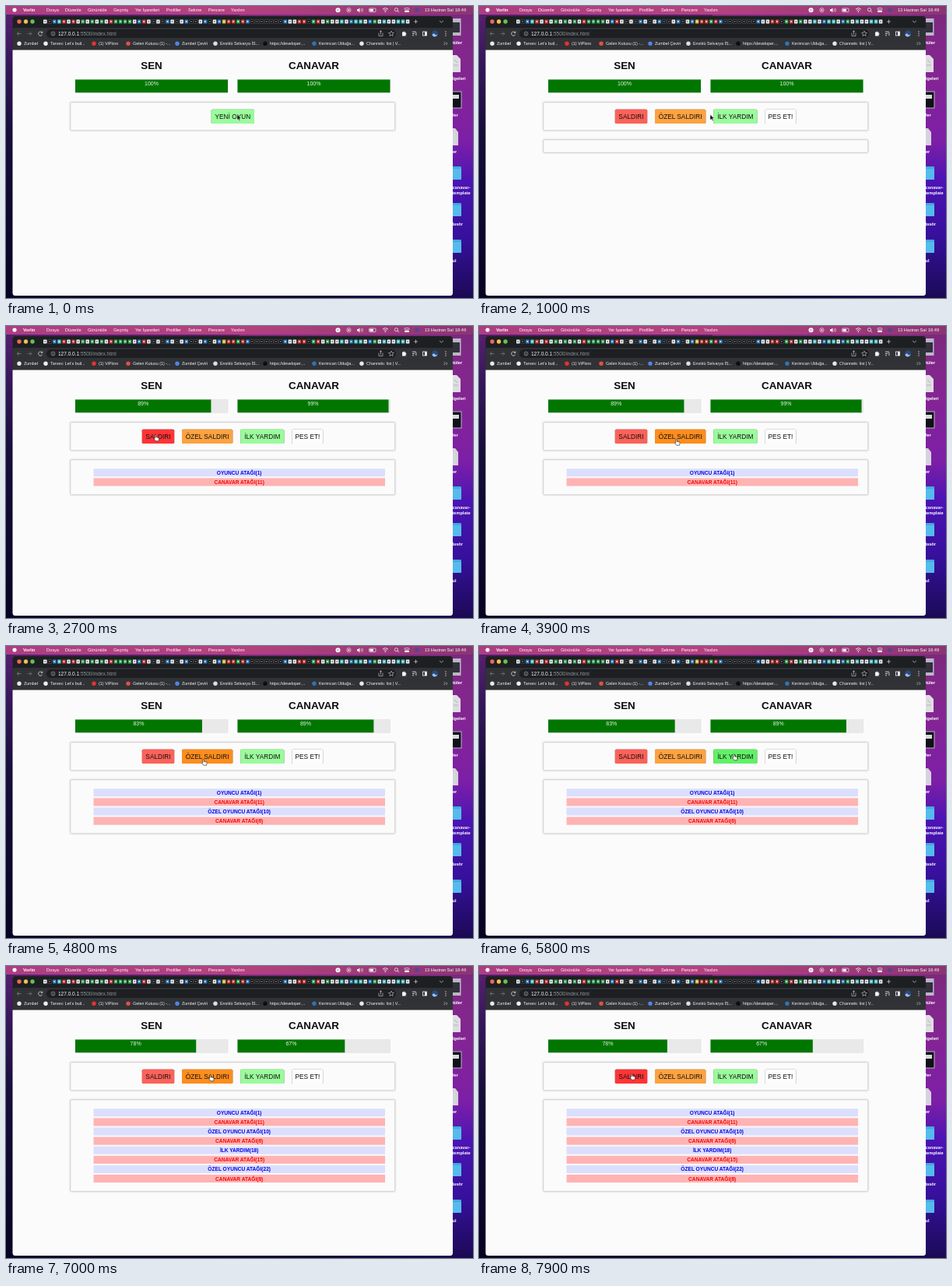
Recreate the animation shown at these times as an HTML page. Size 600x375 px, loop 8 s.

```html
<!DOCTYPE html>
<html lang="tr">
<head>
<meta charset="utf-8">
<title>Canavar Oyunu</title>
<style>
html, body { margin: 0; width: 100%; height: 100%; overflow: hidden; background: #1c1048; }
svg { display: block; width: 100vw; height: 100vh; font-family: "Liberation Sans", Arial, sans-serif; }
.panel { fill: #fbfbfb; stroke: #d2d2d2; stroke-width: .5; filter: drop-shadow(0 .8px .9px rgba(0,0,0,.32)); }
.button { filter: drop-shadow(0 .9px .6px rgba(0,0,0,.65)); }
</style>
</head>
<body>
<svg id="stage" viewBox="0 0 600 375" preserveAspectRatio="none">
  <defs>
    <linearGradient id="menu"><stop offset="0" stop-color="#ad3d82"/><stop offset=".5" stop-color="#b5427f"/><stop offset="1" stop-color="#8a3573"/></linearGradient>
    <linearGradient id="left" x2="0" y2="1"><stop offset="0" stop-color="#5c2170"/><stop offset=".2" stop-color="#34165a"/><stop offset=".42" stop-color="#170e3c"/><stop offset=".7" stop-color="#0e0730"/><stop offset="1" stop-color="#080322"/></linearGradient>
    <linearGradient id="right" x2="0" y2="1"><stop offset="0" stop-color="#7b2a7c"/><stop offset=".2" stop-color="#84268f"/><stop offset=".46" stop-color="#7d1fa6"/><stop offset=".6" stop-color="#4c14b4"/><stop offset=".8" stop-color="#35109a"/><stop offset="1" stop-color="#1b0a55"/></linearGradient>
    <linearGradient id="bottom"><stop offset="0" stop-color="#080322"/><stop offset=".6" stop-color="#10062e"/><stop offset="1" stop-color="#1b0a55"/></linearGradient>
  </defs>
  <g id="desktop"></g>
  <g id="browser"></g>
  <g id="game"></g>
  <g id="cursor" stroke-linejoin="round"></g>
</svg>
<script>
const NS = "http://www.w3.org/2000/svg";
const byId = id => document.getElementById(id);

function add(parent, tag, attrs, content) {
  const node = document.createElementNS(NS, tag);
  for (const key in attrs) node.setAttribute(key, attrs[key]);
  if (content !== undefined) node.textContent = content;
  parent.appendChild(node);
  return node;
}
const rect = (p, x, y, width, height, fill, extra) => add(p, "rect", { x, y, width, height, fill, ...extra });
const circle = (p, cx, cy, r, fill, extra) => add(p, "circle", { cx, cy, r, fill, ...extra });
const path = (p, d, stroke, extra) => add(p, "path", { d, stroke, fill: "none", "stroke-width": .8, ...extra });
const text = (p, x, y, size, fill, content, extra) =>
  add(p, "text", { x, y, "font-size": size, fill, ...extra }, content);
const centred = { "text-anchor": "middle" };
const boldCentred = { ...centred, "font-weight": "bold" };

function drawDesktop(g) {
  rect(g, 0, 0, 300, 375, "url(#left)");
  rect(g, 300, 0, 300, 375, "url(#right)");
  rect(g, 0, 371, 600, 4, "url(#bottom)");

  rect(g, 570, 16, 14.5, 22, "#b9b8c4");
  rect(g, 574, 21, 9, 13, "#33303f");
  path(g, "M570 63h9l5 5v17h-14z", "none", { fill: "#dedde2" });
  path(g, "M576 69l4 4M575 76h6", "#a9a7b2");
  rect(g, 570, 110, 15, 21, "#111118", { stroke: "#d8d8df", "stroke-width": .8 });
  rect(g, 574, 114, 8, 5, "#d8d8df");
  path(g, "M570 157h7l4 5v17h-11z", "none", { fill: "#d5d3dc" });
  for (const y of [206, 253, 300]) {
    rect(g, 566, y, 19, 17, "#43a9dd", { rx: 1.2 });
    rect(g, 566, y + 3, 19, 14, "#55bbec", { rx: 1.2 });
  }
  const labels = [[574, 49, "tüler"], [574, 95, "lgeleri"], [574, 142, "ler"], [574, 189, "er"],
    [573.5, 235, "canavar-"], [573.5, 242, "template"], [573.5, 282, "lasör"], [573.5, 329, "ul"]];
  for (const [x, y, label] of labels) text(g, x, y, 5.6, "#fff", label, { "font-weight": "bold" });

  rect(g, 0, 0, 600, 11, "url(#menu)");
  circle(g, 11, 5, 2.6, "#fff");
  text(g, 22, 7.2, 5.6, "#fff", "Vorlin", { "font-weight": "bold" });
  const menus = [[52, "Dosya"], [76, "Düzenle"], [105, "Görüntüle"], [138, "Geçmiş"], [166, "Yer İşaretleri"],
    [206, "Profiller"], [234, "Sekme"], [260, "Pencere"], [289, "Yardım"]];
  for (const [x, label] of menus) text(g, x, 7.2, 5.6, "#fff", label);

  circle(g, 426.5, 5.2, 3, "#fff");
  circle(g, 426.5, 5.2, 1.4, "#d4b4c8");
  circle(g, 440.5, 5.2, 2.6, "none", { stroke: "#fff", "stroke-width": .6 });
  path(g, "M439.7 3.7l2.3 1.5-2.3 1.5z", "none", { fill: "#fff" });
  path(g, "M451 4.2h1.4l2-1.8v5.8l-2-1.8H451z", "none", { fill: "#fff" });
  path(g, "M456 3.6q1.2 1.6 0 3.2M457.5 2.6q2 2.6 0 5.2", "#fff", { "stroke-width": .6 });
  rect(g, 466.5, 3, 8.5, 4.6, "none", { rx: 1, stroke: "#fff", "stroke-width": .6 });
  rect(g, 467.4, 3.9, 4.5, 2.8, "#fff");
  path(g, "M484 4q3.4-3 6.8 0M485.4 5.6q2-1.8 4 0", "#fff");
  circle(g, 487.4, 7.3, .8, "#fff");
  circle(g, 501.5, 4.7, 2.1, "none", { stroke: "#fff", "stroke-width": .7 });
  path(g, "M503 6.2l1.8 1.9", "#fff");
  rect(g, 512, 2.6, 6, 2.2, "none", { rx: 1.1, stroke: "#fff", "stroke-width": .6 });
  rect(g, 512, 5.8, 6, 2.2, "#fff", { rx: 1.1 });
  circle(g, 528, 5.2, 2.8, "#5b4296");
  text(g, 538, 7.2, 5.6, "#fff", "13 Haziran Sal");
  text(g, 577, 7.2, 5.6, "#fff", "18:49");
}

function drawTabs(g) {
  ["#ed6a5e", "#f5bf4f", "#61c554"].forEach((c, i) => circle(g, 17 + i * 8.5, 20, 2.7, c));
  const palette = { w: "#e9edf0", b: "#2f7fc4", r: "#d63a34", g: "#35a853", k: "#08090b",
    c: "#4fc3c9", y: "#e2b23b" };
  const icons = "wkbcrwrw" + "gwgwgwrgggg" + "wbrwk" + "wkbwkwbkkwbkwb" + "yrrgr" +
    "bkkkkkkk" + "bwwrrk" + "grwgwwcwbccwbgwcwwccw";
  [...icons].forEach((code, i) => {
    const x = 48 + i * 6.05;
    const dark = code === "k";
    rect(g, x, 17.4, 4.5, 5, palette[code], { rx: .5, stroke: dark ? "#77797e" : "none", "stroke-width": .5 });
    rect(g, x + 1.4, 19, 1.6, 1.8, dark || code === "w" ? "#777c85" : "#e4e6e8");
  });
  path(g, "M524 20h5M526.5 17.5v5M557 19l2.4 2.2 2.4-2.2", "#d5d6d8", { "stroke-width": .7 });
}

function drawToolbar(g) {
  rect(g, 52, 30, 449, 11, "#1d1f22", { rx: 5.5 });
  path(g, "M19.5 35.5h-5.4m2.4-2.4l-2.4 2.4 2.4 2.4", "#808286");
  path(g, "M27.5 35.5h5.4m-2.4-2.4l2.4 2.4-2.4 2.4", "#75777b");
  path(g, "M46.3 34A2.6 2.6 0 1 0 46.6 36.6M46.8 32.5v2h-2", "#dadce0");
  circle(g, 60.5, 35.5, 2.4, "none", { stroke: "#bfc1c5", "stroke-width": .6 });
  path(g, "M60.5 35v1.8M60.5 33.9v.5", "#bfc1c5", { "stroke-width": .6 });
  const url = text(g, 67, 37.8, 6.5, "#f1f2f3", "");
  add(url, "tspan", {}, "127.0.0.1");
  add(url, "tspan", { fill: "#8d9297" }, ":5500/index.html");

  path(g, "M479 34.5v4h5v-4M481.5 36.8v-5m-1.5 1.4l1.5-1.4 1.5 1.4", "#c9cbce", { "stroke-width": .65 });
  path(g, "M495 32l1 2.3 2.4.2-1.9 1.6.6 2.4-2.1-1.3-2.1 1.3.6-2.4-1.9-1.6 2.4-.2z", "#c9cbce", { "stroke-width": .6 });
  path(g, "M509 33.5h1.4q.8-2 1.6 0h1.6v1.6q2 .8 0 1.6v1.8H509z", "none", { fill: "#f0f1f3" });
  path(g, "M522 33.2h5M522 35.5h3M522 37.8h2M526.9 34v4", "#f0f1f3");
  rect(g, 535.5, 33, 5, 5, "none", { stroke: "#f0f1f3", "stroke-width": .8 });
  rect(g, 538, 33, 2.5, 5, "#f0f1f3");
  circle(g, 551, 35.5, 4, "#234b86");
  path(g, "M547.5 37.2q2-3.4 3.5-1t3.5-.4q-.8 3.5-3.5 3.6-2.6 0-3.5-2.2z", "none", { fill: "#a9bfe0" });
  for (const y of [33, 35.5, 38]) circle(g, 565, y, .65, "#d9dbde");
}

function drawBookmarks(g) {
  const marks = [
    [17, "#e8eaed", "Zumbel"], [51, "#f1f1f1", "Tarvex: Let’s buil..."], [113, "#e5322d", "(1) ViPloro"],
    [157, "#e0523f", "Gelen Kutusu (1) -..."], [220, "#4b86e8", "Zumbel Çeviri"],
    [269, "#d6e0ee", "Enstitü Selvarya İS..."], [333, "#0c0d0f", "https://developer...."],
    [396, "#2b78b9", "Kerimcan Ulduğa..."], [457, "#e6e7ea", "Channels: list  |  V..."]];
  for (const [x, color, label] of marks) {
    circle(g, x, 48.2, 2.7, color);
    text(g, x + 6, 50.1, 5.4, "#f1f2f3", label);
  }
  path(g, "M562.5 46.3l1.8 1.9-1.8 1.9M565.3 46.3l1.8 1.9-1.8 1.9", "#d9dbde", { "stroke-width": .6 });
}

function drawBrowser(g) {
  rect(g, 8.5, 13, 565.5, 359, "#1d1f22", { rx: 4 });
  rect(g, 8.5, 28, 565.5, 30, "#313236");
  path(g, "M8.5 56.5H574V368.5a3.5 3.5 0 0 1-3.5 3.5H12a3.5 3.5 0 0 1-3.5-3.5z", "none", { fill: "#fbfbfb" });
  drawTabs(g);
  drawToolbar(g);
  drawBookmarks(g);
}

function makeBar(g, x, title) {
  const width = 196;
  text(g, x + width / 2, 80.6, 13.4, "#0c0c0c", title, boldCentred);
  rect(g, x, 94.5, width, 16.7, "#e9e9e9", { stroke: "#d4d4d4", "stroke-width": .4 });
  const fill = rect(g, x, 94.5, width, 16.7, "#007600");
  const label = text(g, x, 102.2, 7, "#e6f2e6", "", centred);
  return (shown, value) => {
    const w = width * Math.min(100, shown) / 100;
    fill.setAttribute("width", w);
    label.setAttribute("x", x + w / 2);
    label.textContent = value + "%";
  };
}

function makeButton(g, x, width, label, color, hoverColor) {
  const group = add(g, "g", {});
  const face = rect(group, x, 132.7, width, 18.2, color, { rx: 1.6, class: "button" });
  text(group, x + width / 2, 144.8, 8.3, "#111", label, centred);
  return {
    contains: (px, py) => px > x && px < x + width && py > 132 && py < 151,
    show: visible => group.setAttribute("visibility", visible ? "visible" : "hidden"),
    hover: on => face.setAttribute("fill", on ? hoverColor : color)
  };
}

drawDesktop(byId("desktop"));
drawBrowser(byId("browser"));

const game = byId("game");
const setYou = makeBar(game, 89, "SEN");
const setFoe = makeBar(game, 297.5, "CANAVAR");
rect(game, 83, 124, 416.5, 35.6, "", { class: "panel" });
const newGame = makeButton(game, 263.7, 55.3, "YENİ OYUN", "#99fb9b", "#99fb9b");
const actions = [
  makeButton(game, 174.8, 41.4, "SALDIRI", "#fb625a", "#ff3436"),
  makeButton(game, 226, 65.3, "ÖZEL SALDIRI", "#fda241", "#fd8d1d"),
  makeButton(game, 301.2, 56.2, "İLK YARDIM", "#99fb9b", "#62f067"),
  makeButton(game, 367.3, 40.3, "PES ET!", "#fdfdfd", "#f0f0f0")];
const logPanel = rect(game, 83, 172, 416.5, 16, "", { class: "panel" });

const START = 800, TRANSITION = 500, LOOP = 8000;
const turns = [
  { at: 2100, you: 89, foe: 99, move: "OYUNCU ATAĞI(1)", hit: 11 },
  { at: 4400, you: 83, foe: 89, move: "ÖZEL OYUNCU ATAĞI(10)", hit: 6 },
  { at: 5930, you: 86, foe: 89, move: "İLK YARDIM(18)", hit: 15 },
  { at: 6725, you: 78, foe: 67, move: "ÖZEL OYUNCU ATAĞI(22)", hit: 8 }];

const rows = turns.flatMap(turn => [
  { label: turn.move, fill: "#dcdffc", ink: "#0808e8" },
  { label: `CANAVAR ATAĞI(${turn.hit})`, fill: "#ffb3b3", ink: "#f40808" }
]).map((row, i) => {
  const group = add(game, "g", {});
  const y = 183.2 + 12.1 * i;
  rect(group, 112.5, y, 374.5, 10.2, row.fill);
  text(group, 299.7, y + 7.6, 6.6, row.ink, row.label, boldCentred);
  return group;
});

const cursor = byId("cursor");
const arrow = path(cursor, "M-1.5-3V4L.2 2.5 1.4 5.1 2.6 4.6 1.4 2.1H3.7z", "#fff", { fill: "#000", "stroke-width": .5 });
const hand = path(cursor, "M-1.6-3.3q.8-.8 1.5 0v2.6l2.9.6q.9.3.8 1.4l-.5 2.9H-.7L-3 1.1q0-1 1.4-.3z", "#1a1a1a", { fill: "#fff", "stroke-width": .6 });

// Cursor legs: start, end, destination
const home = [298.5, 142.5];
const legs = [
  [1000, 1650, 193, 143.5], [3100, 3750, 254.5, 149], [4900, 5500, 328.5, 142.5],
  [6130, 6500, 263.5, 143.5], [7250, 7750, 197, 142]];

const clamp = v => Math.max(0, Math.min(1, v));
const smooth = v => v * v * (3 - 2 * v);

// CSS "ease" curve, solved by bisection
function ease(x) {
  if (x <= 0 || x >= 1) return clamp(x);
  const bezier = (a, b, s) => 3 * a * s * (1 - s) ** 2 + 3 * b * s * s * (1 - s) + s ** 3;
  let lo = 0, hi = 1;
  for (let i = 0; i < 16; i++) {
    const mid = (lo + hi) / 2;
    if (bezier(.25, .25, mid) < x) lo = mid; else hi = mid;
  }
  return bezier(.1, 1, lo);
}

function cursorAt(t) {
  let [x, y] = home;
  for (const [start, end, toX, toY] of legs) {
    const k = smooth(clamp((t - start) / (end - start)));
    x += (toX - x) * k;
    y += (toY - y) * k;
  }
  return [x, y];
}

function render(t) {
  const started = t >= START;
  const done = turns.filter(turn => t >= turn.at);
  const shown = { you: 100, foe: 100 };
  for (const turn of done) {
    const k = ease((t - turn.at) / TRANSITION);
    shown.you += (turn.you - shown.you) * k;
    shown.foe += (turn.foe - shown.foe) * k;
  }
  const health = done[done.length - 1] || { you: 100, foe: 100 };
  setYou(shown.you, health.you);
  setFoe(shown.foe, health.foe);

  const count = done.length * 2;
  rows.forEach((row, i) => row.setAttribute("visibility", i < count ? "visible" : "hidden"));
  logPanel.setAttribute("visibility", started ? "visible" : "hidden");
  logPanel.setAttribute("height", count ? 20.3 + 12.1 * count : 16);

  const [x, y] = cursorAt(t);
  newGame.show(!started);
  let pointing = false;
  for (const button of actions) {
    const over = started && button.contains(x, y);
    button.show(started);
    button.hover(over);
    pointing = pointing || over;
  }
  arrow.setAttribute("visibility", pointing ? "hidden" : "visible");
  hand.setAttribute("visibility", pointing ? "visible" : "hidden");
  cursor.setAttribute("transform", `translate(${x} ${y})`);
}

const origin = performance.now();
function frame() {
  render((performance.now() - origin) % LOOP);
  requestAnimationFrame(frame);
}
frame();
</script>
</body>
</html>
```
